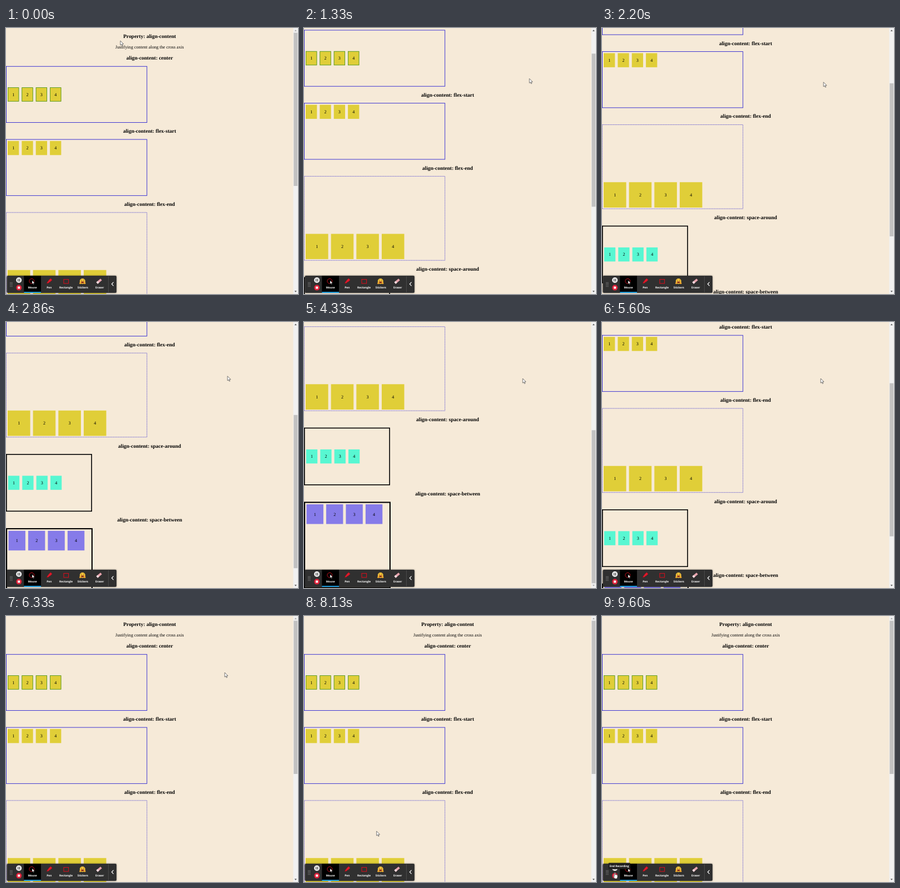
Animation, 526 px wide and 480 px high, one loop 9.93 s. Source, as an HTML page with a canvas:

```html
<!DOCTYPE html>
<html lang="en">
<head>
<meta charset="utf-8">
<title>align-content</title>
<style>
html, body { margin: 0; width: 100%; height: 100%; overflow: hidden; background: #f6ead8; }
canvas { display: block; }
</style>
</head>
<body>
<canvas id="stage" width="526" height="480"></canvas>
<script>
const c = document.getElementById('stage').getContext('2d');
const LOOP = 9930, STEP = 200 / 3, MAX_SCROLL = 324.5;
const SERIF = '"Liberation Serif", serif', SANS = '"Open Sans", sans-serif';
const RED = '#c5121f';

// Keys are [time, value, ...]; values run linearly between them.
const scrollKeys = [
  [0, 0], [800, 0], [1067, 50.7], [1267, 50.7], [1333, 65.3], [1533, 101.4],
  [2000, 101.4], [2533, 253.5], [2733, 253.5], [2867, 277], [3067, 304],
  [3267, 304], [3667, MAX_SCROLL], [4667, MAX_SCROLL], [5133, 179],
  [5533, 179], [5600, 177], [6333, 0]
];
const mouseKeys = [
  [0, 206, 23], [467, 390, 85], [533, 390, 85], [800, 406, 91.3],
  [1533, 406, 91.3], [1733, 399, 97.7], [3267, 399, 97.7], [3667, 394, 102],
  [6867, 394, 102], [7467, 210, 330], [7667, 210, 330], [8667, 40, 455],
  [8933, 32, 460], [9267, 23, 463]
];

const boxes = [
  { title: 'center', y: 68.8, w: 254.3, h: 102.2, line: .9, color: '#2821d2',
    item: [20.3, 25.4, '#e0ce38'], x: 3, iy: 107.2, edge: '#3f9226' },
  { title: 'flex-start', y: 200.6, w: 254.3, h: 102.2, line: .9, color: '#2821d2',
    item: [20.3, 25.4, '#e0ce38'], x: 3, iy: 203.9 },
  { title: 'flex-end', y: 332.5, w: 254.3, h: 152.6, line: .9, color: '#544bd0', dash: [.9, .6],
    item: [40.6, 45.6, '#e0ce38'], x: 3, iy: 436.8 },
  { title: 'space-around', y: 515.1, w: 155, h: 104, line: 1.6, color: '#000',
    item: [20.3, 25.4, '#58f7d2'], x: 3.9, iy: 554.4 },
  { title: 'space-between', y: 648.9, w: 156, h: 156, line: 2.1, color: '#000',
    item: [30.4, 35.5, '#867be9'], x: 4.5, iy: 653.6 }
];

function track(keys, t) {
  const i = keys.findIndex(k => k[0] > t);
  if (i < 0) return keys.at(-1).slice(1);
  const a = keys[i - 1], b = keys[i], p = (t - a[0]) / (b[0] - a[0]);
  return a.slice(1).map((v, j) => v + (b[j + 1] - v) * p);
}

function rect(x, y, w, h, color, r = 0) {
  c.fillStyle = color;
  c.beginPath();
  c.roundRect(x, y, w, h, r);
  c.fill();
}

function frame(x, y, w, h, color, line) {
  c.strokeStyle = color;
  c.lineWidth = line;
  c.strokeRect(x + line / 2, y + line / 2, w - line, h - line);
}

function disc(x, y, r, color) {
  c.fillStyle = color;
  c.beginPath();
  c.arc(x, y, r, 0, 7);
  c.fill();
}

function text(s, x, y, font, color = '#000') {
  c.font = font;
  c.fillStyle = color;
  c.fillText(s, x, y);
}

function shape(d, x, y, fill, stroke, line = 1, size = 1, turn = 0) {
  const path = new Path2D(d);
  c.save();
  c.translate(x, y);
  c.rotate(turn);
  c.scale(size, size);
  if (fill) { c.fillStyle = fill; c.fill(path); }
  if (stroke) { c.strokeStyle = stroke; c.lineWidth = line; c.stroke(path); }
  c.restore();
}

const ARROW = 'M0 0V16L3.8 12.6 6.3 18.4 8.8 17.3 6.3 11.6H11.5Z';
const HAND = 'M4 1C4-1 7-1 7 1V8L9 7.500 12 8 15 9.500V16L13 22H5L0 14C-1 11 2 11 4 14Z';

function drawPage(scroll) {
  c.save();
  c.translate(0, -scroll);
  text('Property: align-content', 258.7, 18.2, `bold 9.48px ${SERIF}`);
  text('Justifying content along the cross axis', 258.7, 37.1, `8.11px ${SERIF}`);
  for (const b of boxes) {
    text(`align-content: ${b.title}`, 258.7, b.y - 11.6, `bold 9.48px ${SERIF}`);
    c.setLineDash(b.dash || []);
    frame(0, b.y, b.w, b.h, b.color, b.line);
    c.setLineDash([]);
    const [w, h, color] = b.item;
    for (let i = 0; i < 4; i++) {
      const x = b.x + i * (w + 5.07);
      rect(x, b.iy, w, h, color);
      if (b.edge) frame(x, b.iy, w, h, b.edge, .8);
      text(i + 1, x + w / 2, b.iy + h / 2 + 2.7, `8.11px ${SERIF}`);
    }
  }
  c.restore();
}

function drawScrollbar(scroll) {
  rect(517.4, 0, 8.6, 480, '#f1f1f1');
  rect(518.3, 8.6 + scroll * .575, 6.8, 276.4, '#c1c1c1');
  shape('M-2 1.2 0-1.200 2 1.200Z', 521.7, 4.5, scroll > 0 ? '#505050' : '#a3a3a3');
  shape('M-2-1.200 0 1.200 2-1.200Z', 521.7, 475.5, scroll < MAX_SCROLL ? '#505050' : '#a3a3a3');
}

function drawToolbar() {
  c.save();
  c.shadowColor = '#0008';
  c.shadowBlur = 3;
  rect(1.500, 447, 197.5, 31, '#303030', 2);
  c.restore();
  rect(32.3, 447, 30.7, 31, '#000');
  rect(32.3, 476, 30.7, 2, '#1398dc');
  rect(184, 448, .7, 29, '#555');
  for (let i = 0; i < 8; i++) disc(8 + i % 2 * 2.7, 459.3 + (i >> 1) * 2.400, .6, '#bbb');

  disc(23.2, 455, 5, '#f4f4f4');
  rect(21.2, 452.6, 1.2, 4.8, '#303030');
  rect(24, 452.6, 1.2, 4.8, '#303030');
  disc(23.2, 468.6, 5, '#e0213a');
  rect(21.2, 466.6, 4, 4, '#fff', .6);

  ['Mouse', 'Pen', 'Rectangle', 'Stickers', 'Eraser'].forEach((s, i) =>
    text(s, 47.5 + i * 30.3, 470.2, `bold 4.9px ${SANS}`, '#fff'));

  c.strokeStyle = RED;
  c.lineWidth = 1;
  c.beginPath();
  c.arc(46.3, 456.8, 4.4, 0, 7);
  c.stroke();
  shape(ARROW, 47, 455.5, '#fff', '#000', 1, .4);
  shape('M-6 0-3-1.500H0V-2H5.500V2H0V1.500H-3Z', 77.8, 457, '#e01a2b', '#8e0d18', .5, 1, -.75);
  frame(103.4, 453, 9.800, 8.500, RED, 1.2);

  disc(137.8, 457, 5, '#f8c73c');
  shape('M-3-1.500Q-2-3-1-1.500M1-1.500Q2-3 3-1.500', 137.8, 457, null, '#5b3512', .8);
  shape('M-3 .4H3Q2.500 3.500 0 3.500T-3 .4Z', 137.8, 457, '#8a2c1c');
  disc(133.8, 460.5, 1.700, '#f0a52c');
  disc(141.8, 460.5, 1.700, '#f0a52c');

  shape('M-5-2H5V2H-5Z', 167.7, 457, '#e8a3ad', null, 1, 1, -.7);
  shape('M-5-2H-1.500V2H-5Z', 167.7, 457, '#f5dade', null, 1, 1, -.7);
  shape('M1.600-3.400-1.600 0 1.600 3.400', 192, 462, null, '#fff', 1.2);
}

function drawTooltip(alpha) {
  c.globalAlpha = alpha;
  rect(11.500, 445.5, 39.5, 11.3, '#202020', 1.5);
  text('End Recording', 31.2, 452.8, `bold 4.9px ${SANS}`, '#fff');
  c.globalAlpha = 1;
}

function draw(now) {
  const t = Math.floor((now % LOOP + 8) / STEP) * STEP;
  const [scroll] = track(scrollKeys, t);
  const [x, y] = track(mouseKeys, t);
  c.textAlign = 'center';
  c.textRendering = 'geometricPrecision';
  rect(0, 0, 526, 480, '#f6ead8');
  drawPage(scroll);
  drawScrollbar(scroll);
  drawToolbar();
  if (t > 9390) drawTooltip(Math.min(1, (t - 9333) / 200));
  if (t > 8990) shape(HAND, x - 2.500, y, '#fff', '#222', 1.2, .5);
  else shape(ARROW, x, y, '#fff', '#333', 1.3, .507);
  requestAnimationFrame(draw);
}
requestAnimationFrame(draw);
</script>
</body>
</html>
```
